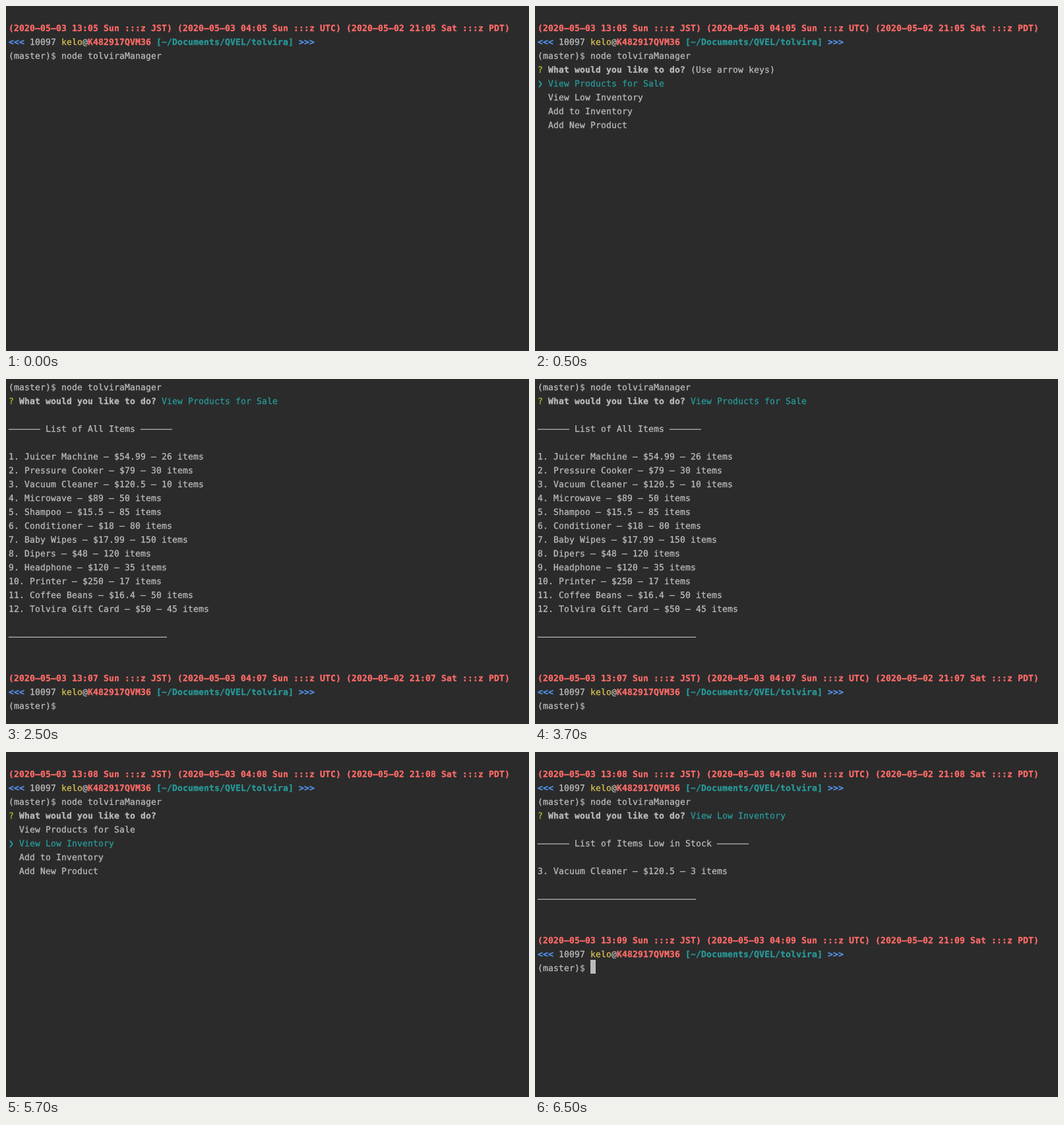
These frames come from a looping animation (793 px wide and 523 px high, 8000 ms). An HTML page:

```html
<!DOCTYPE html>
<html lang="en">
<head>
<meta charset="utf-8">
<title>Store manager terminal</title>
<style>
  html, body { margin: 0; width: 100%; height: 100%; overflow: hidden; background: #2b2b2b; }
  svg { display: block; color: #bbbbbb; }
  text {
    font: 13px "DejaVu Sans Mono", "Liberation Mono", monospace;
    letter-spacing: calc(8px - 0.60205em);
    text-rendering: geometricPrecision;
    white-space: pre;
    fill: currentColor;
    stroke: currentColor;
    stroke-width: 0.3px;
  }
  .bold, .red, .blue, .path { font-weight: bold; }
  .red { color: #ff6b68; }
  .blue { color: #5394ec; }
  .path, .cyan { color: #299999; }
  .green { color: #a8c023; }
  .yellow { color: #d6bf55; }
  .dim { color: #aaaaaa; }
  .cursor { fill: currentColor; }
</style>
</head>
<body>
<svg id="stage" width="793" height="523" viewBox="0 0 793 523"></svg>
<script>
const CELL = 8, LINE = 21, LEFT = 4, BASE = 17, LOOP = 8000;
const stage = document.getElementById('stage');

function add(parent, tag, attrs, text = '') {
  const el = document.createElementNS('http://www.w3.org/2000/svg', tag);
  for (const key in attrs) el.setAttribute(key, attrs[key]);
  el.textContent = text;
  parent.appendChild(el);
  return el;
}

// A line is a list of [style, text] runs laid out on the character grid.
const plain = text => [['', text]];
const blank = [];
const dash = n => '–'.repeat(n);
const title = text => plain(`${dash(6)} ${text} ${dash(6)}`);
const shell = (command = '') => [['', '(master)'], ['dim', '$'], ['', ' ' + command]];
const start = shell('node tolviraManager');

const prompt = minute => [
  [['red', `(2020–05–03 13:${minute} Sun :::z JST) (2020–05–03 04:${minute} Sun :::z UTC) (2020–05–02 21:${minute} Sat :::z PDT)`]],
  [['blue', '<<<'], ['', ' 10097 '], ['yellow', 'kelo'], ['', '@'], ['red', 'K482917QVM36'],
   ['', ' '], ['path', '[~/Documents/QVEL/tolvira]'], ['', ' '], ['blue', '>>>']]
];

const ask = (style = '', reply = '') =>
  [['green', '?'], ['bold', ' What would you like to do? '], [style, reply]];

const choices = ['View Products for Sale', 'View Low Inventory', 'Add to Inventory', 'Add New Product'];
const menu = picked => choices.map((text, i) =>
  i === picked ? [['cyan', '❯'], ['cyan', ' ' + text]] : plain('  ' + text));

const stock = [
  ['Juicer Machine', 54.99, 26], ['Pressure Cooker', 79, 30], ['Vacuum Cleaner', 120.5, 10],
  ['Microwave', 89, 50], ['Shampoo', 15.5, 85], ['Conditioner', 18, 80],
  ['Baby Wipes', 17.99, 150], ['Dipers', 48, 120], ['Headphone', 120, 35],
  ['Printer', 250, 17], ['Coffee Beans', 16.4, 50], ['Tolvira Gift Card', 50, 45]
];
const item = ([name, price, count], i) => plain(`${i + 1}. ${name} – $${price} – ${count} items`);

const screens = [
  { at: 0, lines: [blank, ...prompt('05'), start] },
  { at: 500, lines: [blank, ...prompt('05'), start, ask('', '(Use arrow keys)'), ...menu(0)] },
  { at: 2500, lines: [start, ask('cyan', choices[0]), blank, title('List of All Items'), blank,
      ...stock.map(item), blank, plain(dash(30)), blank, blank, ...prompt('07'), shell()] },
  { at: 4500, lines: [blank, ...prompt('08'), start, ask(), ...menu(1)] },
  { at: 6500, cursor: [10, 15], lines: [blank, ...prompt('08'), start, ask('cyan', choices[1]), blank,
      title('List of Items Low in Stock'), blank, item(['Vacuum Cleaner', 120.5, 3], 2), blank,
      plain(dash(30)), blank, blank, ...prompt('09'), shell()] }
];

for (const screen of screens) {
  const group = screen.group = add(stage, 'g', { visibility: 'hidden' });
  screen.lines.forEach((line, row) => {
    let col = 0;
    for (const [style, text] of line) {
      const body = text.trimStart();
      const x = LEFT + (col + text.length - body.length) * CELL;
      if (body) add(group, 'text', { x, y: row * LINE + BASE, class: style }, body);
      col += text.length;
    }
  });
  if (screen.cursor) {
    const [col, row] = screen.cursor;
    add(group, 'rect', { x: LEFT + col * CELL, y: row * LINE, width: CELL, height: LINE, class: 'cursor' });
  }
}

let shown;
function draw(now) {
  const t = now % LOOP;
  const next = screens.filter(s => s.at <= t).pop();
  if (next !== shown) {
    for (const s of screens) s.group.setAttribute('visibility', s === next ? 'visible' : 'hidden');
    shown = next;
  }
}

const begin = performance.now();
function tick() {
  draw(performance.now() - begin);
  requestAnimationFrame(tick);
}
tick();
</script>
</body>
</html>
```
